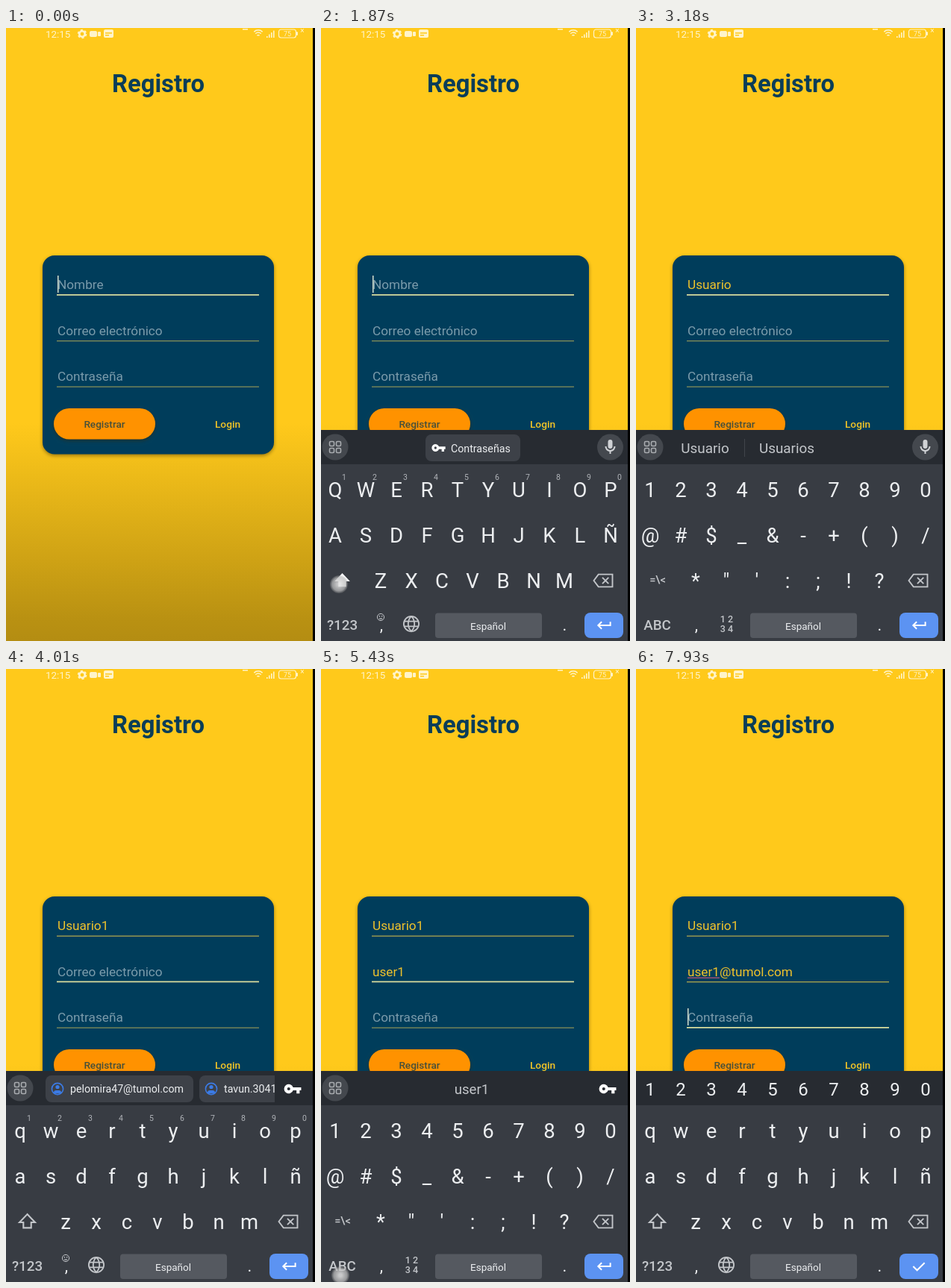
Write an HTML page with a canvas that moves like this. It is 414 by 822 pixels and loops after 8000 ms.

```html
<!DOCTYPE html>
<html lang="es">
<head>
<meta charset="utf-8">
<title>Registro</title>
<style>
  html, body { margin: 0; width: 414px; height: 822px; overflow: hidden; background: #000; }
  canvas { display: block; }
</style>
</head>
<body>
<canvas id="stage" width="414" height="822"></canvas>
<script>
const ctx = document.getElementById('stage').getContext('2d');
const LOOP = 8000, TOUCH = 115, LAG = 70;
const YELLOW = '#ffc91b', NAVY = '#003d5b', KEY = '#eceef0', SOFT = '#c3c6ca', BAR = '#272b31', CHIP = '#3d4148';

const LETTERS = ['qwertyuiop', 'asdfghjklñ', 'zxcvbnm'];
const SYMBOLS = ['1234567890', '@#$_&-+()/', '*"\':;!?'];
const HINTS = ['Nombre', 'Correo electrónico', 'Contraseña'];
const SPOTS = { name: [130, 345], shift: [24, 746], sym: [27, 806], abc: [26, 813], enter: [377, 801], '.': [325, 806] };

// Every tap: time and key.
const TAPS = [
  [780, 'name'], [1790, 'shift'],
  [1990, 'u'], [2110, 's'], [2220, 'u'], [2320, 'a'], [2620, 'r'], [2730, 'i'], [2840, 'o'],
  [3010, 'sym'], [3400, '1'], [3570, 'enter'],
  [4220, 'u'], [4370, 's'], [4510, 'e'], [4640, 'r'], [4780, 'sym'], [4900, '1'],
  [5430, 'abc'], [5640, 'sym'], [5800, '@'], [5960, 'abc'],
  [6110, 't'], [6270, 'u'], [6400, 'm'], [6610, 'o'], [6740, 'l'],
  [6900, '.'], [7040, 'c'], [7180, 'o'], [7300, 'm'], [7480, 'enter']
];

const ICONS = {
  key: 'M12.65 10A6 6 0 1 0 12.65 14H17v4h4v-4h2v-4zM7 14a2 2 0 1 1 0-4 2 2 0 0 1 0 4z',
  mic: 'M12 14a3 3 0 0 0 3-3V5a3 3 0 0 0-6 0v6a3 3 0 0 0 3 3zm5-3a5 5 0 0 1-10 0H5a7 7 0 0 0 6 7v3h2v-3a7 7 0 0 0 6-7z',
  palette: 'M12 3a9 9 0 0 0 0 18 1.5 1.5 0 0 0 1-2.5c-.8-1 0-2.5 1.3-2.5H16a5 5 0 0 0 5-5c0-4.4-4-8-9-8z',
  clipboard: 'M5 5H19V21H5zM9 3h6v3H9zM8.5 10h7M8.5 13.5h7M8.5 17h5',
  globe: 'M12 3a9 9 0 1 0 0 18 9 9 0 0 0 0-18zM3.5 9h17M3.5 15h17M12 3c-5 5-5 13 0 18c5-5 5-13 0-18',
  shift: 'M12 2.5 2 13h5v7h10v-7h5z',
  backspace: 'M6 4h18v16H6L0 12zM11 8l8 8M19 8l-8 8',
  enter: 'M21 7v5H4m5-5-5 5 5 5',
  check: 'M4 12l5.5 5.5L20 7',
  wifi: 'M3 9a13 13 0 0 1 18 0M6 13a8 8 0 0 1 12 0M9.5 17a4 4 0 0 1 5 0'
};
for (const name in ICONS) ICONS[name] = new Path2D(ICONS[name]);

function icon(name, x, y, size, color, line = 0) {
  ctx.save();
  ctx.translate(x, y);
  ctx.scale(size / 24, size / 24);
  ctx.translate(-12, -12);
  ctx.fillStyle = ctx.strokeStyle = color;
  ctx.lineWidth = line;
  if (line) ctx.stroke(ICONS[name]); else ctx.fill(ICONS[name], 'evenodd');
  ctx.restore();
}

function text(str, x, y, size, color, align = 'center', weight = 400) {
  ctx.font = `${weight} ${size}px Roboto, sans-serif`;
  ctx.fillStyle = color;
  ctx.textAlign = align;
  ctx.fillText(str, x, y);
}

function box(x, y, w, h, r, color) {
  ctx.fillStyle = color;
  ctx.beginPath();
  ctx.roundRect(x, y, w, h, r);
  ctx.fill();
}

function disc(x, y, r, color) {
  box(x - r, y - r, 2 * r, 2 * r, r, color);
}

function ring(x, y, r, width, color, dash = []) {
  ctx.strokeStyle = color;
  ctx.lineWidth = width;
  ctx.setLineDash(dash);
  ctx.beginPath();
  ctx.arc(x, y, r, 0, 7);
  ctx.stroke();
  ctx.setLineDash([]);
}

function gear(x, y, r, color) {
  ring(x, y, r * 0.6, r * 0.42, color);
  ring(x, y, r * 0.88, r * 0.26, color, [r * 0.5, r * 0.42]);
}

function spotOf(key) {
  if (SPOTS[key]) return SPOTS[key];
  for (const page of [LETTERS, SYMBOLS])
    for (let row = 0; row < 3; row++) {
      const col = page[row].indexOf(key);
      if (col >= 0) return [15 + 41 * col + (row === 2 ? 61 : 0), 626 + 61 * row];
    }
}

function stateAt(t) {
  const s = { values: ['', '', ''], field: 0, symbols: false, caps: false };
  for (const [time, key] of TAPS) {
    if (time + LAG > t) break;
    if (key === 'shift') s.caps = true;
    else if (key === 'sym') s.symbols = true;
    else if (key === 'abc') s.symbols = false;
    else if (key === 'enter') { s.field++; s.symbols = false; }
    else if (key !== 'name') {
      s.values[s.field] += s.caps ? key.toUpperCase() : key;
      s.caps = false;
    }
  }
  return s;
}

function statusBar() {
  const w = '#fff4c9';
  text('12:15', 53, 12.5, 13.4, w, 'left');
  gear(102, 8, 6.2, w);
  box(112, 4, 10, 8, 2, w);
  box(123, 5, 4, 6, 1, w);
  box(131, 2, 13, 11, 2, w);
  box(133, 6, 9, 1.5, 0, YELLOW);
  box(133, 9, 5, 1.5, 0, YELLOW);
  box(317, 1, 7, 1.5, 0, w);
  icon('wifi', 338, 7, 15, w, 2.4);
  for (let i = 0; i < 4; i++) box(349 + 3 * i, 11 - 2.5 * i, 1.6, 2 + 2.5 * i, 0, w);
  ctx.strokeStyle = w;
  ctx.lineWidth = 1.2;
  ctx.beginPath();
  ctx.roundRect(365.5, 2, 23, 11, 3);
  ctx.stroke();
  box(389, 5, 2, 5, 1, w);
  text('75', 377, 11, 9, w);
  text('×', 397, 7, 10, w);
}

function form(s, cursorOn) {
  text('Registro', 204, 86, 32.8, '#0a3d58', 'center', 700);
  ctx.save();
  ctx.shadowColor = 'rgba(60,40,0,.5)';
  ctx.shadowBlur = 5;
  ctx.shadowOffsetY = 2;
  box(49, 305, 310, 266.5, 16, NAVY);
  box(64, 510, 136, 41.5, 21, '#ff9200');
  ctx.restore();
  HINTS.forEach((hint, i) => {
    const y = 350 + 61.5 * i, value = s.values[i], active = i === s.field;
    text(value || hint, 69, y, 17.2, value ? '#efc22c' : '#7b9bab', 'left');
    const end = 69 + (value ? ctx.measureText(value).width : 0);
    if (value.includes('@')) box(69, y + 2, ctx.measureText('user1').width, 1.2, 0, '#c2557a');
    if (active && cursorOn) box(end, y - 18, 1.5, 23, 0, '#d5dfce');
    box(68, y + (active ? 7 : 7.6), 271, active ? 1.8 : 1.2, 0, active ? '#d9dc9e' : value ? '#b3a84c' : '#8a9058');
  });
  text('Registrar', 132, 536, 13.6, '#46503a', 'center', 500);
  text('Login', 297, 536, 13.7, '#f5c526', 'center', 500);
}

function avatarChip(x, w, label) {
  box(x, 545, w, 36, 8, CHIP);
  ring(x + 16, 563, 7.6, 1.6, '#3b7be6');
  disc(x + 16, 560.5, 2.6, '#3b7be6');
  box(x + 11, 565, 10, 4, [4, 4, 1, 1], '#3b7be6');
  text(label, x + 33, 568, 14.2, KEY, 'left');
}

function suggestionBar(s) {
  const value = s.values[s.field];
  box(0, 539, 411, 46, 0, BAR);
  if (s.field === 2) {
    [...SYMBOLS[0]].forEach((d, i) => text(d, 19 + 41 * i, 572, 24, KEY));
    return;
  }
  disc(19, 562, 17.5, '#44484e');
  ctx.strokeStyle = '#a9acb0';
  ctx.lineWidth = 1.6;
  for (const x of [11.5, 20.5]) for (const y of [554.5, 563.5]) {
    ctx.beginPath();
    ctx.roundRect(x, y, 6, 6, 1.5);
    ctx.stroke();
  }
  if (s.field === 0) {
    disc(387.5, 562, 17.5, '#44484e');
    icon('mic', 387.5, 562, 24, '#d0d2d5');
    if (!value) {
      box(140, 545, 127, 36, 8, CHIP);
      icon('key', 157.5, 563, 20, '#fff');
      text('Contraseñas', 174, 568.5, 14.2, KEY, 'left');
    } else if (/\d/.test(value)) {
      text(value, 202, 569.5, 18.6, SOFT);
    } else {
      text(value, 92.5, 569.5, 18.9, SOFT);
      text(value + 's', 202, 569.5, 18.9, SOFT);
      box(145, 551, 1, 24, 0, '#41454b');
    }
    return;
  }
  icon('key', 384, 563, 25, '#fff');
  if (!value) {
    avatarChip(53, 198, 'pelomira47@tumol.com');
    ctx.save();
    ctx.beginPath();
    ctx.rect(259, 540, 101, 45);
    ctx.clip();
    avatarChip(259, 130, 'tavun.30419');
    ctx.restore();
  } else if (!value.includes('@')) {
    text(value, 202, 569.5, 18.6, SOFT);
  } else {
    text('GIF', 93.5, 568, 15, '#5d6167', 'center', 700);
    icon('clipboard', 167, 562, 23, '#b4b7bb', 1.9);
    gear(240, 562, 9.5, '#b4b7bb');
    icon('palette', 314, 562, 24, '#b4b7bb');
    for (const [x, y] of [[308, 562], [311, 557], [317, 557], [320, 562]]) disc(x, y, 1.6, BAR);
  }
}

function keyboard(s) {
  const password = s.field === 2;
  box(0, 539, 411, 283, 0, '#383c43');
  suggestionBar(s);
  (s.symbols ? SYMBOLS : LETTERS).forEach((row, r) => [...row].forEach((c, i) => {
    const x = 19 + 41 * i + (r === 2 ? 61 : 0);
    text(s.caps ? c.toUpperCase() : c, x, 628.5 + 61 * r, 27.5, KEY);
    if (r === 0 && !s.symbols && !password) text(SYMBOLS[0][i], x + 12, 606, 10.5, '#b0b3b8');
  }));

  if (s.symbols) {
    text('=\\<', 29, 745, 14.5, SOFT, 'center', 500);
    text('1 2', 121.5, 797, 12.5, SOFT, 'center', 500);
    text('3 4', 121.5, 810, 12.5, SOFT, 'center', 500);
  } else {
    icon('shift', 28.5, 741, 25, s.caps ? '#f4f5f6' : SOFT, s.caps ? 0 : 2);
    icon('globe', 121, 799, 27, SOFT, 1.6);
    if (!password) {
      ring(80, 790, 4.6, 1, SOFT);
      box(77.8, 788, 1.3, 1.5, 0, SOFT);
      box(81, 788, 1.3, 1.5, 0, SOFT);
      box(77.8, 791.5, 4.5, 1.2, 1, SOFT);
    }
  }
  icon('backspace', 378, 741, 25, SOFT, 1.8);
  text(s.symbols ? 'ABC' : '?123', 28.5, 806.5, 18.8, SOFT, 'center', 500);
  text(',', 81, 808, 22, KEY);
  text('.', 326.5, 808, 22, KEY);
  box(153, 784.5, 143, 33.5, 4, '#555960');
  text('Español', 224, 806.5, 13.5, KEY);
  box(353, 784, 52, 34, 8, '#5c93f2');
  icon(password ? 'check' : 'enter', 379, 801, 23, '#fff', 2.1);
}

function touches(t) {
  for (const [time, key] of TAPS) {
    if (t < time || t > time + TOUCH) continue;
    const [x, y] = spotOf(key);
    const glow = ctx.createRadialGradient(x, y, 2, x, y, 12);
    glow.addColorStop(0, 'rgba(225,225,225,.85)');
    glow.addColorStop(0.7, 'rgba(190,190,190,.7)');
    glow.addColorStop(1, 'rgba(150,150,150,.25)');
    disc(x, y, 12, glow);
  }
}

const backdrop = ctx.createLinearGradient(0, 530, 0, 822);
backdrop.addColorStop(0, YELLOW);
backdrop.addColorStop(0.12, '#f6c21a');
backdrop.addColorStop(0.9, '#b99112');
backdrop.addColorStop(1, '#b48d12');

function draw(now) {
  const t = now % LOOP, s = stateAt(t);
  const rise = Math.min(1, Math.max(0, (t - 980) / 300));
  box(0, 0, 414, 822, 0, backdrop);
  statusBar();
  form(s, t < 780 || t % 1000 >= 500);
  if (rise) {
    ctx.save();
    ctx.translate(0, 283 * (1 - rise) ** 3);
    keyboard(s);
    ctx.restore();
  }
  touches(t);
  box(411, 0, 3, 822, 0, '#000');
  requestAnimationFrame(() => draw(performance.now() - start));
}

const start = performance.now();
draw(0);
</script>
</body>
</html>
```
